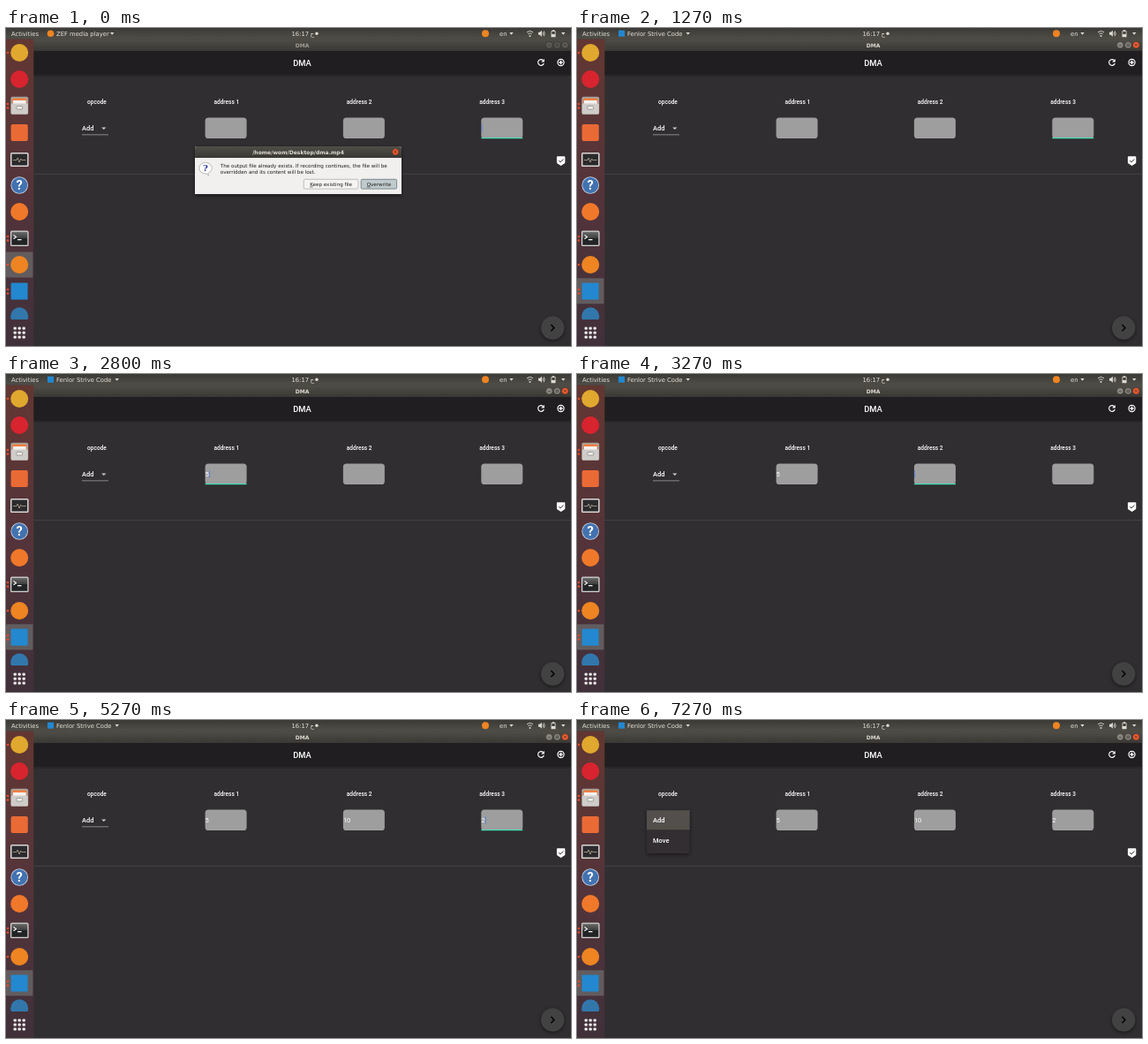
An HTML page that plays this animation: 640x360 px, repeating every 8 s.

```html
<!DOCTYPE html>
<html lang="en">
<head>
<meta charset="utf-8">
<title>DMA</title>
<style>
html, body { margin: 0; width: 100%; height: 100%; overflow: hidden; background: #302e30; }
svg { display: block; width: 100vw; height: 100vh; }
text { white-space: pre; }
.ui { font-family: "DejaVu Sans", sans-serif; font-size: 6.8px; fill: #e6e2da; }
.title { font-family: "DejaVu Sans", sans-serif; font-size: 6.05px; font-weight: 700; text-anchor: middle; fill: #dfdbd2; }
.msg { font-family: "DejaVu Sans", sans-serif; font-size: 5.6px; fill: #1c1c1c; }
.app { font-family: Roboto, sans-serif; fill: #fff; font-size: 6.56px; }
.mid { text-anchor: middle; }
.big { font-size: 9.4px; font-weight: 500; }
.label { font-weight: 500; }
.item { font-size: 7.5px; font-weight: 500; }
.value { font-size: 7.5px; }
.line { fill: none; stroke: #fff; }
.key { text-decoration: underline; }
</style>
</head>
<body>
<svg viewBox="0 0 640 360" xmlns="http://www.w3.org/2000/svg">
  <defs>
    <linearGradient id="dockFill" x2="0" y2="1">
      <stop stop-color="#623732"/><stop offset=".5" stop-color="#54343a"/><stop offset="1" stop-color="#40303a"/>
    </linearGradient>
    <linearGradient id="panelFill" x2="0" y2="1">
      <stop stop-color="#3b3a36"/><stop offset="1" stop-color="#504e47"/>
    </linearGradient>
    <linearGradient id="barFill" x2="0" y2="1">
      <stop stop-color="#504e47"/><stop offset="1" stop-color="#3a3834"/>
    </linearGradient>
    <linearGradient id="screenFill" x2="0" y2="1">
      <stop stop-color="#6a6a6a"/><stop offset=".5" stop-color="#3a3b3c"/><stop offset=".5" stop-color="#222426"/>
    </linearGradient>
    <filter id="soft" x="-20%" y="-30%" width="140%" height="170%">
      <feDropShadow dx="0" dy="1.5" stdDeviation="2" flood-opacity=".5"/>
    </filter>
    <clipPath id="dockClip"><rect y="13" width="31" height="317"/></clipPath>
  </defs>

  <!-- window -->
  <rect x="31" y="12" width="609" height="348" fill="#302e30"/>
  <rect x="31" y="52" width="609" height="3" fill="#000" opacity=".14"/>
  <rect x="31" y="26" width="609" height="27" fill="#201e20"/>
  <rect x="31" y="12.5" width="609" height="13.5" fill="url(#barFill)"/>
  <text id="winTitle" class="title" x="335.5" y="21.5">DMA</text>
  <g id="winButtons"></g>
  <text class="app mid big" x="335.5" y="42.7">DMA</text>
  <g class="line" stroke-width="1.15">
    <path d="M608.6 36.7A3.4 3.4 0 1 0 609.3 40"/>
    <path d="M609.8 34.9v3.7h-3.7z" fill="#fff" stroke="none"/>
    <circle cx="628.5" cy="39" r="3.6"/>
    <path d="M626.3 39h4.4M628.5 36.8v4.4" stroke-width="1.3"/>
  </g>
  <g id="labels"></g>
  <g id="picker">
    <text class="app item" x="86" y="116.2">Add</text>
    <path d="M108.2 112.4h5.2l-2.6 2.6z" fill="#d0d0d0"/>
    <rect x="86" y="120.6" width="30" height=".6" fill="#c4c4c4"/>
  </g>
  <g id="fields"></g>
  <path d="M624.8 145.2h7.6q.9 0 .9.9v6.2q0 .6-.5.9l-4.2 2.9-4.2-2.9q-.5-.3-.5-.9v-6.2q0-.9.9-.9z" fill="#fff"/>
  <path d="M626.2 150.1l1.8 1.8 3.4-3.4" class="line" style="stroke:#302e30" stroke-width="1"/>
  <rect x="31" y="165" width="609" height=".8" fill="#474547"/>
  <circle cx="619.2" cy="339.4" r="13.1" fill="#424242" filter="url(#soft)"/>
  <path d="M617.4 335.8l3.5 3.6-3.5 3.6" fill="none" stroke="#000" stroke-width="1.4"/>

  <g id="menu" filter="url(#soft)">
    <rect x="79" y="102" width="48.6" height="49" rx="1" fill="#302e30"/>
    <rect x="79" y="102.3" width="48.6" height="21.9" fill="#52504e"/>
    <text class="app item" x="86" y="116.2">Add</text>
    <text class="app item" x="86" y="138.6">Move</text>
  </g>

  <!-- top panel -->
  <rect width="640" height="12.7" fill="url(#panelFill)"/>
  <text class="ui" x="6" y="8.8">Activities</text>
  <g id="appIcon"></g>
  <text id="appName" class="ui" x="57" y="8.8"></text>
  <path id="appCaret" d="M0 5h4.4l-2.2 2.7z" fill="#dfdbd2"/>
  <text class="ui" x="323.5" y="8.8">16:17</text>
  <text class="ui" x="344.5" y="9">ح</text>
  <circle cx="352" cy="6.2" r="1.7" fill="#dfdbd2"/>
  <circle cx="543" cy="6.2" r="4" fill="#ee8422"/>
  <text class="ui" x="559" y="8.8">en</text>
  <g fill="#dfdbd2">
    <path d="M570.3 5h4.4l-2.2 2.7zM629 5h4.4l-2.2 2.7z"/>
    <path d="M603 4.8h1.7l2.2-2v7l-2.2-2H603z"/>
    <path d="M617.5 3.2h1.3v-.9h2.4v.9h1.3v7h-5zM618.3 4v3h3.4V4z" fill-rule="evenodd"/>
    <circle cx="593.5" cy="9" r="1"/>
  </g>
  <g fill="none" stroke="#dfdbd2" stroke-width=".9">
    <path d="M590 4.8q3.5-3 7 0M591.4 6.8q2.1-1.8 4.2 0"/>
    <path d="M608 4.8q1 1.5 0 3M609.2 3.4q2 2.9 0 5.8"/>
  </g>

  <!-- dock -->
  <rect y="12.7" width="31.3" height="347.3" fill="url(#dockFill)"/>
  <rect id="tile" width="30.4" height="29" rx="1" fill="#625c5e"/>
  <g id="dock" clip-path="url(#dockClip)">
    <circle cx="15.2" cy="28" r="10" fill="#e0a82e"/>
    <circle cx="15.2" cy="58" r="10" fill="#d8242f"/>
    <g>
      <rect x="5.4" y="77.8" width="19.8" height="20" rx="2" fill="#a5a29e"/>
      <rect x="7.2" y="79.4" width="16.2" height="6" rx="1" fill="#ef7f43"/>
      <rect x="8" y="82" width="14.6" height="4" fill="#f4f2f0"/>
      <rect x="5.8" y="85.6" width="19" height="11.8" rx="1" fill="#cfccc9"/>
      <rect x="12" y="88.4" width="6.6" height="3.6" rx=".8" fill="#f4f2f0" stroke="#85817c" stroke-width=".7"/>
    </g>
    <rect x="5.6" y="109" width="19.2" height="19" rx="2" fill="#ea6a35"/>
    <g>
      <rect x="5" y="141" width="20.6" height="16" rx="1.6" fill="#d9d8d6"/>
      <rect x="6.5" y="142.5" width="17.6" height="13" fill="#2b2a2c"/>
      <path d="M8 149.5h4l1.2-2.5 1.9 5 1.6-4 1 1.5h5" fill="none" stroke="#c9b9a2" stroke-width=".7"/>
    </g>
    <g>
      <circle cx="15.2" cy="178" r="9.8" fill="#c8d4e4"/>
      <circle cx="15.2" cy="178" r="9" fill="#4272b0"/>
      <text x="15.2" y="183.2" class="app mid" style="font-size:14.5px;font-weight:700">?</text>
    </g>
    <circle cx="15.2" cy="208" r="10" fill="#f0782a"/>
    <g>
      <rect x="5" y="229.5" width="20.6" height="17.5" rx="1.6" fill="#d4d3d1"/>
      <rect x="6.3" y="230.8" width="18" height="14.9" fill="url(#screenFill)"/>
      <path d="M8.5 234.4l3 2.2-3 2.2M13 239.6h4.5" class="line" stroke-width="1.1"/>
    </g>
    <circle cx="15.2" cy="268" r="10" fill="#ee8422"/>
    <rect x="5.6" y="288.5" width="19" height="19" rx="1" fill="#2388cf"/>
    <circle cx="15.2" cy="326.2" r="10" fill="#3277ac"/>
  </g>
  <g id="dots" fill="#e9482a"></g>
  <g id="grid" fill="#f2f0ee"></g>

  <!-- dialog -->
  <g id="dialog">
    <path d="M214 188v-51q0-3 3-3h228q3 0 3 3v51z" fill="#f1f0ee" filter="url(#soft)"/>
    <path d="M214 147v-10q0-3 3-3h228q3 0 3 3v10z" fill="url(#barFill)"/>
    <text class="title" x="331" y="142.6">/home/wom/Desktop/dma.mp4</text>
    <circle cx="441.2" cy="140.3" r="3.7" fill="#ea5a2c" stroke="#2e2c29" stroke-width=".5"/>
    <path d="M439.9 139l2.6 2.6m0-2.6l-2.6 2.6" stroke="#4b2416" stroke-width=".7"/>
    <path d="M226 152.4c4.2 0 7.2 2.7 7.2 6.1 0 2.9-2 5-4.6 5.8l1.2 2.6-4.3-2.3c-3.9-.1-6.7-2.8-6.7-6.1 0-3.4 3-6.1 7.2-6.1z" fill="#fff" stroke="#8d8d8d" stroke-width=".6"/>
    <text x="226" y="162.1" class="mid" style="font:700 10px 'DejaVu Serif','Noto Serif',serif" fill="#2630a0">?</text>
    <text class="msg" x="242.8" y="157.6">The output file already exists. If recording continues, the file will be</text>
    <text class="msg" x="242.8" y="164.5">overridden and its content will be lost.</text>
    <rect x="337.3" y="171.3" width="61.6" height="10.8" rx="1.3" fill="#f5f4f3" stroke="#aaa7a2" stroke-width=".7"/>
    <text class="msg mid" x="368.1" y="178.7"><tspan class="key">K</tspan>eep existing file</text>
    <rect x="402.2" y="171.3" width="40.4" height="10.8" rx="1.3" fill="#c1cacc" stroke="#5f757c" stroke-width=".8"/>
    <text class="msg mid" x="422.4" y="178.7"><tspan class="key">O</tspan>verwrite</text>
  </g>
</svg>
<script>
const LOOP = 8000;
const FIELD_X = [225.6, 381.9, 538.3];
const DIGIT = 4.21;

// start, focused field (-1 none), caret shown, typed values
const STEPS = [
  [0, 2, 1, "", "", ""],
  [470, 2, 0, "", "", ""],
  [800, 2, 1, "", "", ""],
  [1270, 2, 0, "", "", ""],
  [1800, 0, 1, "", "", ""],
  [2270, 0, 0, "", "", ""],
  [2800, 0, 1, "5", "", ""],
  [3270, 1, 1, "5", "", ""],
  [3800, 1, 0, "5", "", ""],
  [4270, 1, 1, "5", "10", ""],
  [4800, 2, 1, "5", "10", ""],
  [5270, 2, 1, "5", "10", "2"],
  [5800, 2, 0, "5", "10", "2"],
  [6270, 2, 1, "5", "10", "2"],
  [6800, 2, 0, "5", "10", "2"],
  [7270, -1, 0, "5", "10", "2"]
];
const DIALOG_END = 470, MENU_START = 7270;

const $ = id => document.getElementById(id);
const set = (el, attrs) => {
  for (const k in attrs) el.setAttribute(k, attrs[k]);
  return el;
};
const add = (parent, tag, attrs, text = "") => {
  const el = document.createElementNS("http://www.w3.org/2000/svg", tag);
  el.textContent = text;
  return parent.appendChild(set(el, attrs));
};
const show = (el, on) => { el.style.display = on ? "" : "none"; };

[["opcode", 103], ["address 1", 249.8], ["address 2", 400.2], ["address 3", 550.6]].forEach(
  ([name, x]) => add($("labels"), "text", { class: "app mid label", x, y: 86.3 }, name));

const fields = FIELD_X.map(x => {
  const g = $("fields");
  add(g, "rect", { x, y: 101.5, width: 47, height: 23.6, rx: 3.7, fill: "#9e9e9e" });
  return {
    line: add(g, "rect", { x, y: 124, width: 47, height: 1.2, fill: "#45e0ba" }),
    text: add(g, "text", { class: "app value", x, y: 116 }),
    caret: add(g, "rect", { y: 109.2, width: 0.95, height: 8.4, fill: "#5c82d6" })
  };
});

const buttons = [615.3, 624.3, 633.3].map((cx, i) => {
  const g = $("winButtons");
  const disc = add(g, "circle", { cx, cy: 19.3, r: 3.8, stroke: "#2b2926", "stroke-width": 0.5 });
  const d = [`M${cx - 1.4} 19.8h2.8`, `M${cx - 1.2} 18.1h2.4v2.4h-2.4z`,
    `M${cx - 1.2} 18.1l2.4 2.4m0-2.4l-2.4 2.4`][i];
  add(g, "path", { d, fill: "none", stroke: "#35322e", "stroke-width": 0.7 });
  return disc;
});

[28, 86, 90.5, 236, 240.5, 268, 296, 300.5].forEach(
  cy => add($("dots"), "circle", { cx: 2, cy, r: 1.3 }));
for (let i = 0; i < 9; i++) {
  add($("grid"), "rect", { x: 8.6 + (i % 3) * 5, y: 338.4 + Math.floor(i / 3) * 5, width: 3.2, height: 3.2, rx: 0.8 });
}

const orb = add($("appIcon"), "circle", { cx: 50.5, cy: 6.2, r: 3.8, fill: "#ee8422" });
const block = add($("appIcon"), "rect", { x: 47, y: 2.7, width: 7, height: 7, fill: "#2388cf" });

function draw(t) {
  const asking = t < DIALOG_END, menu = t >= MENU_START;
  const [, focus, caret, ...values] = STEPS.findLast(s => s[0] <= t);

  show($("dialog"), asking);
  show($("menu"), menu);
  show($("picker"), !menu);
  show(orb, asking);
  show(block, !asking);
  $("appName").textContent = asking ? "ZEF media player" : "Fenlor Strive Code";
  set($("appCaret"), { transform: `translate(${asking ? 118 : 123.5} 0)` });
  set($("tile"), { y: asking ? 253.5 : 283.2 });
  set($("winTitle"), { opacity: asking ? 0.6 : 1 });
  buttons.forEach((b, i) => set(b, { fill: asking ? "#5d5b56" : i < 2 ? "#8b8880" : "#ee5a30" }));

  fields.forEach((f, i) => {
    f.text.textContent = values[i];
    show(f.line, i === focus);
    show(f.caret, i === focus && caret);
    set(f.caret, { x: FIELD_X[i] + 0.3 + values[i].length * DIGIT });
  });
}

const start = performance.now();
function tick() {
  draw((performance.now() - start) % LOOP);
  requestAnimationFrame(tick);
}
tick();
</script>
</body>
</html>
```
